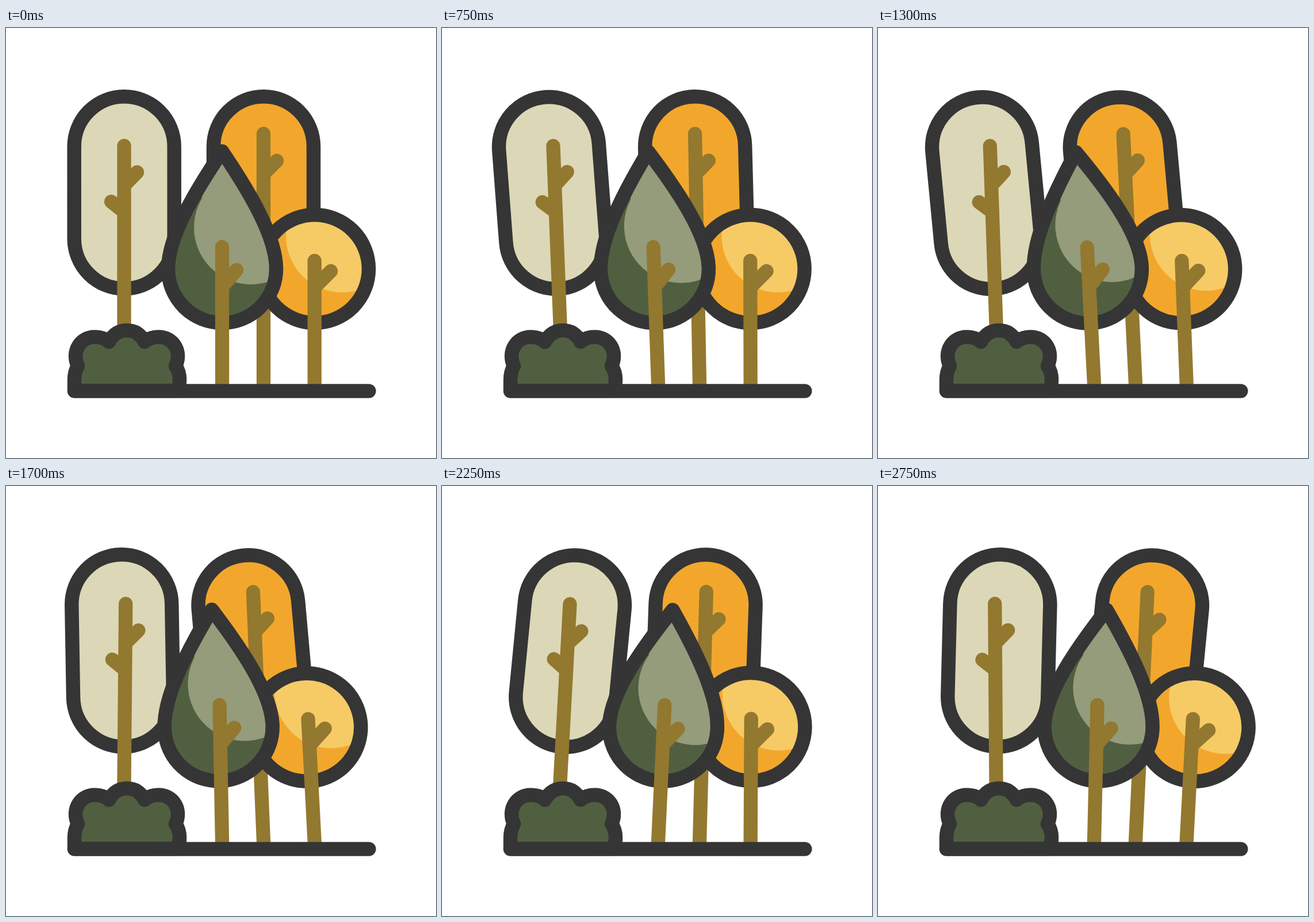
Write an HTML page that moves like this. It is 748 px wide and 748 px high and loops after 2800 ms.

```html
<!DOCTYPE html>
<html lang="en">
<head>
<meta charset="utf-8">
<title>Swaying trees</title>
<style>
html, body { margin: 0; width: 100%; height: 100%; overflow: hidden; background: #fff; }
svg { display: block; width: 100vw; height: 100vh; }
.line, .wood { fill: none; stroke-linejoin: round; stroke-linecap: round; }
.line { stroke: #353535; stroke-width: 24.5; }
.wood { stroke: #93782f; stroke-width: 24.3; }
.beige { fill: #dcd8b7; }
.orange { fill: #f2a72c; }
.yellow { fill: #f6cb66; }
.sage { fill: #959c7b; }
.green { fill: #515f41; }
</style>
</head>
<body>
<svg viewBox="0 0 748 748">
  <defs>
    <path id="drop" d="M376 214.5C424 285.5 470 363 470 419A94 94 0 0 1 282 419C282 363 328 285.5 376 214.5Z"/>
    <circle id="ball" cx="537" cy="419" r="94"/>
    <rect id="tall" x="-87" y="119.2" width="174" height="334.3" rx="87"/>
    <path id="bush" d="M119 631V612Q119 598 125 588C113 562 130 537.5 154 537.5Q170 537.5 179 546Q190 526 210 526Q231 526 241 546Q250 537.5 266 537.5C290 537.5 307 562 295 588Q302 598 302 611Q302 622 299 631Z"/>
    <clipPath id="inDrop"><use href="#drop"/></clipPath>
    <clipPath id="inBall"><use href="#ball"/></clipPath>
  </defs>

  <g id="beigeCrown">
    <use href="#tall" x="205.7" class="beige"/>
    <use href="#tall" x="205.7" class="line"/>
  </g>
  <path id="beigeTrunk" class="wood" d="M205.5 205V545M228 251L205.5 274M183 302L205.5 320"/>

  <g id="orangeCrown">
    <use href="#tall" x="448" class="orange"/>
    <use href="#tall" x="448" class="line"/>
  </g>
  <path id="orangeTrunk" class="wood" d="M448 184V625M471 231L448 254"/>

  <g id="ballCrown">
    <use href="#ball" class="orange"/>
    <circle cx="585" cy="362" r="98" class="yellow" clip-path="url(#inBall)"/>
    <use href="#ball" class="line"/>
  </g>
  <path id="ballTrunk" class="wood" d="M536.7 405V625M565 423L538 450"/>

  <g id="dropCrown">
    <use href="#drop" class="green"/>
    <g class="sage" clip-path="url(#inDrop)">
      <circle cx="426" cy="347" r="99"/>
      <path d="M341 200H480V346H341Z"/>
    </g>
    <use href="#drop" class="line"/>
  </g>
  <path id="dropTrunk" class="wood" d="M376 381V625M401 421L377 449"/>

  <use href="#bush" class="green"/>
  <use href="#bush" class="line"/>
  <path class="line" d="M119 631.5H631.3"/>
</svg>
<script>
const LOOP = 2800, STEP = 50;
const SWAY = [[0, 0], [1200, -1], [2400, 1], [3000, 0]];
const LEAD = [[0, 0], [1000, -0.8], [2350, 1], [2850, -0.23]];
const QUICK = [[0, 0], [1080, -1], [2160, 1], [2700, 0]];

// id, pivot x, pivot y, degrees, delay in ms, keys
const parts = [
  ["beigeTrunk", 205.5, 515, 3.2, 0, LEAD],
  ["beigeCrown", 205.7, 466, 5.75, -40, SWAY],
  ["dropTrunk", 376, 619, 3, 30, SWAY],
  ["dropCrown", 376, 530, 5.75, 115, SWAY],
  ["orangeTrunk", 448, 619, 2.9, 250, SWAY],
  ["orangeCrown", 448, 505, 5.6, 320, SWAY],
  ["ballTrunk", 536.7, 619, 3, 600, QUICK],
  ["ballCrown", 537, 552, 5.9, 620, QUICK]
].map(([id, ...rest]) => [document.getElementById(id), ...rest]);

// cubic-bezier(.42, 0, .58, 1)
function ease(x) {
  let lo = 0, hi = 1;
  for (let i = 0; i < 20; i++) {
    const s = (lo + hi) / 2, r = 1 - s;
    if (1.26 * s * r * r + 1.74 * s * s * r + s * s * s < x) lo = s;
    else hi = s;
  }
  return lo * lo * (3 - 2 * lo);
}

function valueAt(keys, t) {
  if (t <= 0) return keys[0][1];
  for (let i = 1; i < keys.length; i++) {
    const [t0, a] = keys[i - 1], [t1, b] = keys[i];
    if (t < t1) return a + (b - a) * ease((t - t0) / (t1 - t0));
  }
  return keys[keys.length - 1][1];
}

function draw(now) {
  const t = Math.floor((now % LOOP) / STEP) * STEP;
  for (const [el, x, y, deg, delay, keys] of parts) {
    const angle = deg * valueAt(keys, t - delay);
    el.setAttribute("transform", `rotate(${angle.toFixed(3)} ${x} ${y})`);
  }
}

let start = null;
function tick(now) {
  if (start === null) start = now;
  draw(now - start);
  requestAnimationFrame(tick);
}
draw(0);
requestAnimationFrame(tick);
</script>
</body>
</html>
```
